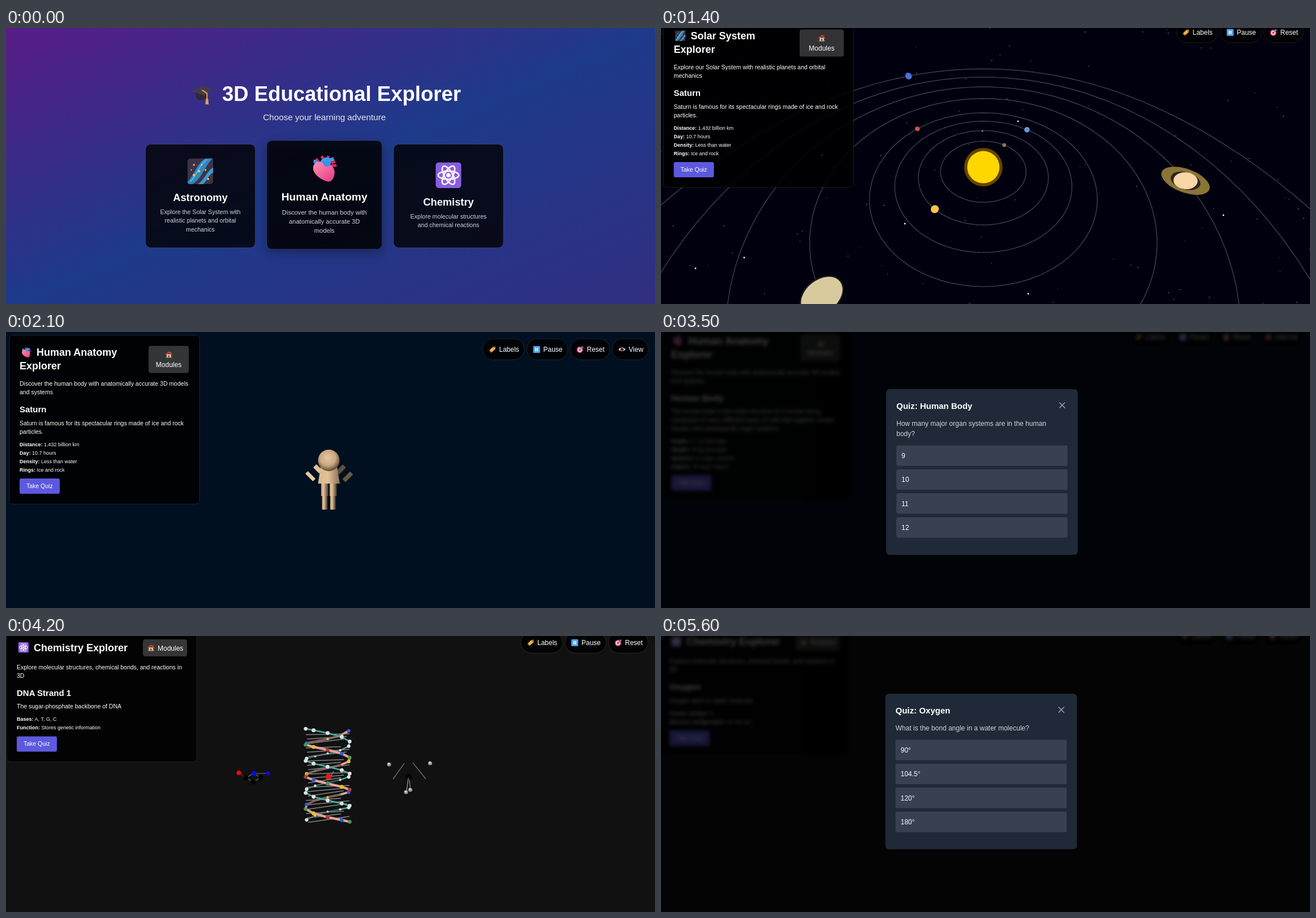
Recreate the animation shown at these times as an HTML page. Size 1147x488 px, loop 6.3 s.

```html
<!DOCTYPE html>
<html lang="en">
<head>
<meta charset="utf-8">
<title>3D Educational Explorer</title>
<style>
html, body { margin: 0; width: 100%; height: 100%; overflow: hidden; background: #000; }
svg { display: block; }
#stage { width: 100vw; height: 100vh; }
text { font-family: "Liberation Sans", Arial, sans-serif; white-space: pre; }
.scene { display: none; }
.raised { filter: drop-shadow(0 6px 9px rgba(0,0,0,.4)); }
.blurred { filter: blur(3px); }
</style>
</head>
<body>
<svg id="stage" viewBox="0 0 1147 488">
  <defs>
    <linearGradient id="sky" x2="1" y2="1">
      <stop stop-color="#581c87"/><stop offset=".5" stop-color="#1e3a8a"/><stop offset="1" stop-color="#312e81"/>
    </linearGradient>
    <linearGradient id="limb">
      <stop stop-color="#b8966c"/><stop offset=".3" stop-color="#e8c79c"/><stop offset="1" stop-color="#4b3b2d"/>
    </linearGradient>
    <linearGradient id="torso">
      <stop stop-color="#d9b88c"/><stop offset=".45" stop-color="#e3c198"/><stop offset="1" stop-color="#8b7056"/>
    </linearGradient>
    <radialGradient id="head" cx=".45" cy=".38" r=".62">
      <stop stop-color="#e8c8a0"/><stop offset=".6" stop-color="#c9a67e"/><stop offset="1" stop-color="#5b4734"/>
    </radialGradient>
    <linearGradient id="pink" x2="1" y2="1"><stop stop-color="#ff8fb5"/><stop offset="1" stop-color="#e63a80"/></linearGradient>

    <symbol id="galaxy" viewBox="0 0 20 20">
      <rect width="20" height="20" rx="2.5" fill="#3d3347"/>
      <path d="M0 18C5 14 7 4 14 0H20C14 4 12 15 4 20H2Q0 20 0 18Z" fill="#3187bd"/>
      <path d="M8 20C13 17 15 10 20 7V11C16 13 15 18 12 20Z" fill="#3b9bd2"/>
      <path d="M2 18C7 14 9 5 15 1" stroke="#55b4e2" fill="none"/>
      <g fill="#ffc83d"><circle cx="5" cy="5" r=".7"/><circle cx="11" cy="5" r=".6"/><circle cx="9" cy="10" r=".9"/>
      <circle cx="5" cy="13" r=".9"/><circle cx="14" cy="9" r=".7"/><circle cx="16" cy="16" r=".8"/><circle cx="3" cy="9" r=".5"/></g>
    </symbol>
    <symbol id="heart" viewBox="0 0 20 20">
      <path d="M6 6L4 3M10 5L8 1M12 5L13 1M15 6L18 5M15 8L19 8" stroke="#e0245e" stroke-width="2"/>
      <path d="M2 5Q5 5 5 9M8 6Q10 2 14 4L17 3" stroke="#3b9af0" stroke-width="2.6" fill="none"/>
      <path d="M2 8C4 4 8 5 10 7C14 6 18 9 17.500 14C17 18 15 20 13 20C8 19 0 14 2 8Z" fill="url(#pink)"/>
      <path d="M9 7Q11 3 15 5Q15 9 11 9Z" fill="#3d8fe8"/>
    </symbol>
    <symbol id="atom" viewBox="0 0 20 20">
      <rect width="20" height="20" rx="2.500" fill="#8a5de0"/>
      <g fill="none" stroke="#fff" stroke-width="1.100"><ellipse cx="10" cy="10" rx="8" ry="3.200"/>
      <ellipse cx="10" cy="10" rx="8" ry="3.200" transform="rotate(60 10 10)"/>
      <ellipse cx="10" cy="10" rx="8" ry="3.200" transform="rotate(120 10 10)"/></g>
      <circle cx="10" cy="10" r="1.700" fill="#fff"/>
    </symbol>
    <symbol id="cap" viewBox="0 0 20 20">
      <path d="M4 9L5 14Q10 17 15 12V8Z" fill="#2f2836"/>
      <path d="M0 7L10 2L20 5L12 11Z" fill="#443b4b"/>
      <path d="M10 6L14.500 9V15" stroke="#e59a45" stroke-width="1.100" fill="none"/>
      <path d="M13.500 14H15.500L16 19H13Z" fill="#f29a55"/>
    </symbol>
    <symbol id="house" viewBox="0 0 20 20">
      <path d="M4 9H16V19H4Z" fill="#e8c9a6"/><path d="M10 1L20 10L18 12L10 5L2 12L0 10Z" fill="#d0453f"/>
      <path d="M14 2H17V7L14 5Z" fill="#9b4b43"/><path d="M8 12H12V19H8Z" fill="#8a4f3b"/>
      <path d="M1 19Q1 14 5 15L6 19ZM14 19Q15 14 19 16V19Z" fill="#4f9c45"/>
    </symbol>
    <symbol id="tag" viewBox="0 0 20 20">
      <path d="M2 12L11 3L18 2L18 9L8 18Z" fill="#f7b13c"/><path d="M2 12L8 18L6 19L1 14Z" fill="#c97a2b"/>
      <circle cx="15" cy="5" r="1.500" fill="#6a4520"/>
    </symbol>
    <symbol id="pause" viewBox="0 0 20 20">
      <rect width="20" height="20" rx="3" fill="#4a9ff0"/><path d="M6 5H9V15H6ZM11 5H14V15H11Z" fill="#fff"/>
    </symbol>
    <symbol id="target" viewBox="0 0 20 20">
      <circle cx="9" cy="11" r="9" fill="#e0416a"/><circle cx="9" cy="11" r="6" fill="#f5e8ef"/><circle cx="9" cy="11" r="3.500" fill="#e0416a"/>
      <path d="M9 11L16 4" stroke="#3b79c8" stroke-width="1.800"/><path d="M14 5V2L17 0V3H20L18 6Z" fill="#4a9ff0"/>
    </symbol>
    <symbol id="eye" viewBox="0 0 20 20">
      <path d="M0 10Q10 -1 20 10Q10 21 0 10Z" fill="#f3e6ee"/><circle cx="10" cy="10" r="5" fill="#7d4533"/><circle cx="10" cy="10" r="2.500" fill="#1b1418"/>
    </symbol>
  </defs>
</svg>
<script>
const SCENE_MS = 700, W = 1147, H = 488, TAU = Math.PI * 2;

const rect = (x, y, w, h, r, fill, more = '') =>
  `<rect x="${x}" y="${y}" width="${w}" height="${h}" rx="${r}" fill="${fill}" ${more}/>`;
const circle = (x, y, r, fill) => `<circle cx="${x}" cy="${y}" r="${r}" fill="${fill}"/>`;
const line = (x1, y1, x2, y2, color, w) =>
  `<path d="M${x1} ${y1}L${x2} ${y2}" stroke="${color}" stroke-width="${w}"/>`;
const text = (x, y, size, str, more = '') => `<text x="${x}" y="${y}" font-size="${size}" fill="#fff" ${more}>${str}</text>`;
const icon = (name, x, y, size) => `<use href="#${name}" x="${x}" y="${y}" width="${size}" height="${size}"/>`;
const lines = (x, y, step, size, rows, more) => rows.map((s, i) => text(x, y + i * step, size, s, more)).join('');
const backdrop = color => rect(-30, -30, W + 60, H + 60, 0, color);
const BOLD = 'font-weight="700"', MID = 'text-anchor="middle"', EDGE = 'stroke="#fff" stroke-opacity=".1"';

/* ---- menu ---- */
function card(cx, iconName, iconY, titleY, title, rows, k = 1) {
  const w = 194 * k, h = 183 * k, size = 45.5 * k;
  return `<g ${k > 1 ? 'class="raised"' : ''}>` + rect(cx - w / 2, 297 - h / 2 - (k > 1 ? 2 : 0), w, h, 9, 'rgba(0,0,0,.8)', EDGE) + '</g>' +
    icon(iconName, cx - size / 2, iconY, size) +
    text(cx, titleY, 18.3 * k, title, BOLD + MID.padStart(MID.length + 1)) +
    lines(cx, titleY + (k > 1 ? 25 : 23), 15.3 * k, 10.65 * k, rows, MID + ' style="fill:#d1d5db"');
}
const menu = () => rect(0, 0, W, H, 0, 'url(#sky)') +
  icon('cap', 327, 98, 39) +
  text(382, 129, 36.5, '3D Educational Explorer', BOLD) +
  text(562.7, 163, 15.25, 'Choose your learning adventure', MID + ' style="fill:#e5e7eb"') +
  card(343.5, 'galaxy', 230.5, 306, 'Astronomy', ['Explore the Solar System with', 'realistic planets and orbital', 'mechanics']) +
  card(562.7, 'heart', 224, 304.5, 'Human Anatomy', ['Discover the human body with', 'anatomically accurate 3D', 'models'], 1.05) +
  card(782, 'atom', 237.5, 314, 'Chemistry', ['Explore molecular structures', 'and chemical reactions']);

/* ---- shared interface ---- */
const PILLS = {
  Labels: ['tag', 73.5], Pause: ['pause', 72.5], Reset: ['target', 69.5], View: ['eye', 64], Internal: ['heart', 79]
};
function toolbar(x, y, extra = []) {
  let out = '';
  for (const name of ['Labels', 'Pause', 'Reset', ...extra]) {
    const [symbol, w] = PILLS[name];
    out += rect(x, y, w, 37, 18.5, 'rgba(0,0,0,.8)', EDGE) + icon(symbol, x + 11, y + 12.5, 12.5) + text(x + 29, y + 23, 12, name);
    x += w + 4.5;
  }
  return out;
}

function panel(x, y, { symbol, title, button, intro, info }) {
  const left = x + 18, [bx, bw] = button, tall = title.length > 1, head = tall ? 48 : 30;
  const by = y + 18.5, titleY = y + (tall ? 36 : 39);
  let out = icon(symbol, left + 2.5, titleY - 15.5, 18.5) + text(left + 30, titleY, 18, title[0], BOLD);
  if (tall) out += text(left, titleY + 24, 18, title[1], BOLD);
  out += rect(x + bx, by, bw, head, 4, 'rgba(255,255,255,.2)') + (tall
    ? icon('house', x + bx + bw / 2 - 6, by + 9, 12.5) + text(x + bx + bw / 2, by + 37, 12, 'Modules', MID)
    : icon('house', x + bx + 8, by + 8.5, 12.5) + text(x + bx + 26, by + 19.5, 12, 'Modules'));
  let base = y + head + 41;
  out += lines(left, base, 15, 10.5, intro);
  base += (intro.length - 1) * 15;
  if (info) {
    out += text(left, base += 32, 15, info.name, BOLD);
    out += lines(left, base += 22.5, 15, 10.5, info.about);
    base += (info.about.length - 1) * 15 + 22;
    out += lines(left, base, 15, 9, info.facts.map(([k, v]) => `<tspan font-weight="700">${k}:</tspan> ${v}`));
    base += (info.facts.length - 1) * 15 + 12.5;
    out += rect(left, base, 71, 27, 3, '#5c59df') + text(left + 12, base + 16.5, 10.5, 'Take Quiz');
    base += 45;
  } else base += 34;
  return rect(x, y, 336, base - y, 7, 'rgba(0,0,0,.85)', EDGE) + out;
}

function quiz(x, y, name, question, answers) {
  let top = y + 65 + question.length * 18 - 1;
  const h = top - y + 193;
  return rect(x, y, 338.5, h, 6, '#1f2937') + text(x + 18, y + 34.5, 15, 'Quiz: ' + name, BOLD) +
    `<path d="M${x + 306} ${y + 23.5}l10 10m0-10l-10 10" stroke="#9ca3af" stroke-width="1.5"/>` +
    lines(x + 18, y + 65, 18, 12, question, 'style="fill:#d1d5db"') +
    answers.map((a, i) => rect(x + 18, top - 0.5 + i * 42.3, 302.5, 36.3, 3, '#374151') + text(x + 27, top + 22 + i * 42.3, 12, a)).join('');
}
const dimmed = (color, content, modal) => backdrop(color) + `<g class="blurred">${content}</g>` + backdrop('rgba(0,0,0,.75)') + modal;

/* ---- astronomy: circles on a plane seen from 45 degrees ---- */
const FOCAL = 352, TILT = Math.SQRT1_2, SUN = { x: 569.7, y: 246 };
function project(orbit, angle) {
  const q = orbit / 94.28, z = q * Math.sin(angle), depth = 1 - TILT * z;
  return { x: SUN.x + FOCAL * q * Math.cos(angle) / depth, y: SUN.y + FOCAL * TILT * z / depth, depth };
}
// orbit, angle in degrees, size, colour
const PLANETS = [
  [20, -31.2, 3.8, '#8c7853'], [30, 145.9, 5.7, '#ffc649'], [40, -38, 5.8, '#6b93d6'], [50, -130.6, 5, '#c8524f'],
  [70, 138.7, 17.3, '#d8ca9d'], [90, 11, 14, '#fad5a5'], [110, 62, 10, '#4fd0e7'], [130, -116.3, 10, '#4b70dd']
];
function planet([orbit, degrees, size, color], step) {
  const p = project(orbit, (degrees - step * 500 / orbit) * TAU / 360);
  const dx = p.x - SUN.x, dy = p.y - SUN.y, r = size / p.depth;
  const stretch = Math.hypot(1, Math.hypot(dx, dy) / FOCAL), turn = Math.atan2(dy, dx) * 360 / TAU;
  const oval = (rx, ry, extra, more) => `<ellipse rx="${rx}" ry="${ry}" transform="translate(${p.x} ${p.y}) rotate(${turn + extra})" ${more}/>`;
  const ring = orbit === 90
    ? oval(r * 3, r * 1.4, 16, 'fill="#8a7436"') + oval(r * 1.8, r * 1.02, 12, 'fill="#2b2620"') : '';
  const rim = orbit === 70 ? 'stroke="#1a191e" stroke-width="5" paint-order="stroke"' : '';
  return ring + oval(r * stretch, r, 0, `fill="${color}" ${rim}`);
}
function stars() {
  let seed = 11, out = '';
  const random = () => (seed = seed * 16807 % 2147483647) / 2147483647;
  for (let i = 0; i < 120; i++) out += circle(random() * W, random() * H, 0.8, `rgba(255,255,255,${0.2 + random() * 0.5})`);
  for (const [x, y] of [[568, 182], [631, 165], [285, 225], [147, 406], [431, 346], [649, 470], [994, 331], [61, 425]])
    out += circle(x, y, 1.4, '#fff');
  return out;
}
function solarSystem(step) {
  const orbits = PLANETS.map(([orbit]) => {
    const points = Array.from({ length: 96 }, (_, i) => project(orbit, i / 96 * TAU)).map(p => `${p.x},${p.y}`);
    return `<polygon points="${points.join(' ')}" fill="none" stroke="#3c3c48" stroke-width="1.5"/>`;
  });
  return backdrop('#00000f') + stars() + orbits.join('') + circle(SUN.x, SUN.y, 34, '#664400') + circle(SUN.x, SUN.y, 28.5, '#ffd700') +
    PLANETS.map(p => planet(p, step)).join('');
}

/* ---- anatomy ---- */
function mannequin(dy) {
  const arm = (x, y, len, w, turn, fill) => rect(-len / 2, -w / 2, len, w, 1, fill, `transform="translate(${x} ${y}) rotate(${turn})"`);
  return `<g transform="translate(0 ${dy})">` +
    arm(551, 242, 15, 8, 45, '#dfc297') + arm(538, 255, 19, 6.5, 45, '#e6cb9b') +
    arm(592, 243, 17, 8, -45, '#5f4d3c') + arm(604, 256, 19, 7.5, -45, '#6a5743') +
    rect(557, 267, 12.5, 23, 0, 'url(#limb)') + rect(572, 267, 12.5, 23, 0, 'url(#limb)') +
    rect(558.5, 290, 9.5, 24, 0, 'url(#limb)') + rect(573, 290, 9.5, 24, 0, 'url(#limb)') +
    '<path d="M556 238H585L590 268H551.500Z" fill="url(#torso)"/>' + circle(570.5, 227, 19, 'url(#head)') + '</g>';
}

/* ---- chemistry ---- */
function dna() {
  const node = (k, side) => {
    const a = k * TAU / 10, z = side * Math.cos(a), s = 1 + 0.073 * z;
    return { x: 568.5 + side * 40 * Math.sin(a) * s, y: 250 + (5.55 * k - 73.1) * s, z, s };
  };
  const parts = [];
  for (let i = 0; i < 21; i++) {
    const y = 176 + i * 7.6, lean = i % 3 * 3 + 3, cut = i % 4 * 5;
    parts.push([i % 2 ? 0.3 : -0.5, line(530 + (i % 3) * 2, y + (y - 250) * .02, 607 - cut, y - lean, '#858585', 1.5)]);
  }
  for (const side of [1, -1])
    for (let k = -2; k < 28; k++) {
      const a = node(k, side), b = node(k + 1, side), near = a.z > -0.35;
      const tube = side > 0 ? (near ? '#45aaa3' : '#2b716c') : (near ? '#e9a09b' : '#80605d');
      const bead = side > 0 ? '#dfe3e3' : ['#e3c81f', '#a83a38', '#2d5fd0', '#4a9a58'][(k + 4) % 4];
      if (k < 27) parts.push([(a.z + b.z) / 2, line(a.x, a.y, b.x, b.y, tube, (side > 0 ? 2.6 : 4) * a.s)]);
      parts.push([a.z + 0.4, circle(a.x, a.y, (near ? 3.2 : 2.3) * a.s, bead)]);
    }
  parts.push([0, circle(570, 249, 5.5, '#e01818') + line(574, 248, 579, 239, '#8a8a8a', 1.5)]);
  return parts.sort((a, b) => a[0] - b[0]).map(p => p[1]).join('');
}
const sideMolecules = () =>
  line(411, 242, 424, 251, '#8a2020', 1.5) + line(424, 251, 437, 243, '#555', 1.5) + line(424, 251, 437, 258, '#555', 1.5) +
  line(437, 258, 450, 250, '#555', 1.5) + line(450, 250, 438, 243, '#555', 1.5) + line(438, 243, 463, 243, '#4a4a90', 1.5) +
  circle(424, 251, 4.5, '#020202') + circle(437, 258, 4.5, '#020202') + circle(450, 250, 4.5, '#020202') +
  circle(411.5, 242, 4, '#f00808') + circle(438, 243, 4, '#0808f0') + circle(463, 243, 3.5, '#0808e8') +
  line(704, 225, 684, 253, '#666', 1.5) + line(719, 224, 742, 253, '#666', 1.5) + circle(711.5, 250, 6, '#020202') +
  line(711, 251, 708, 275, '#8a8a8a', 1.5) + line(713, 254, 714.5, 271, '#777', 1.5) +
  [[677, 227], [749.5, 225], [707, 276], [714.5, 272]].map(([x, y]) => circle(x, y, 3.6, '#8f9893') + circle(x - 0.5, y - 1, 1.8, '#d5dcd8')).join('');
const molecules = (zoom, spread) => `<g transform="translate(568.5 250) scale(${zoom}) translate(-568.5 -250)">` +
  `<g transform="translate(568.5 0) scale(${spread} 1) translate(-568.5 0)">${sideMolecules()}</g>${dna()}</g>`;

/* ---- content ---- */
const saturn = {
  name: 'Saturn', about: ['Saturn is famous for its spectacular rings made of ice and rock', 'particles.'],
  facts: [['Distance', '1.432 billion km'], ['Day', '10.7 hours'], ['Density', 'Less than water'], ['Rings', 'Ice and rock']]
};
const humanBody = {
  name: 'Human Body',
  about: ['The human body is the entire structure of a human being,', 'composed of many different types of cells that together create', 'tissues and subsequently organ systems'],
  facts: [['Height', '1.7 m (average)'], ['Weight', '70 kg (average)'], ['Systems', '11 major systems'], ['Organs', '78 major organs']]
};
const strand = {
  name: 'DNA Strand 1', about: ['The sugar-phosphate backbone of DNA'],
  facts: [['Bases', 'A, T, G, C'], ['Function', 'Stores genetic information']]
};
const oxygen = {
  name: 'Oxygen', about: ['Oxygen atom in water molecule'],
  facts: [['Atomic number', '8'], ['Electron configuration', '1s² 2s² 2p⁴']]
};
const astronomy = info => ({ symbol: 'galaxy', title: ['Solar System', 'Explorer'], button: [240.5, 78], info,
  intro: ['Explore our Solar System with realistic planets and orbital', 'mechanics'] });
const anatomy = info => ({ symbol: 'heart', title: ['Human Anatomy', 'Explorer'], button: [246, 71], info,
  intro: ['Discover the human body with anatomically accurate 3D models', 'and systems'] });
const chemistry = info => ({ symbol: 'atom', title: ['Chemistry Explorer'], button: [241, 78], info,
  intro: ['Explore molecular structures, chemical bonds, and reactions in', '3D'] });

const NIGHT = '#001020', LAB = '#111';
const bodyView = mannequin(-21) + panel(0, -14.5, anatomy(humanBody)) + toolbar(827, -10, ['Internal']);
const oxygenView = panel(-3, -23, chemistry(oxygen)) + toolbar(909, -19);

const scenes = [
  menu(),
  solarSystem(0) + panel(4.5, -16, astronomy()) + toolbar(910.5, -11),
  solarSystem(1) + panel(4.5, -16, astronomy(saturn)) + toolbar(910.5, -11),
  backdrop(NIGHT) + mannequin(0) + panel(6, 6, anatomy(saturn)) + toolbar(842.5, 12, ['View']),
  backdrop(NIGHT) + bodyView,
  dimmed(NIGHT, bodyView, quiz(398, 101, 'Human Body', ['How many major organ systems are in the human', 'body?'], ['9', '10', '11', '12'])),
  backdrop(LAB) + molecules(1, 1) + panel(1, -12.5, chemistry(strand)) + toolbar(910, -7),
  backdrop(LAB) + molecules(1.3, 0.7) + oxygenView,
  dimmed(LAB, oxygenView, quiz(396.5, 102, 'Oxygen', ['What is the bond angle in a water molecule?'], ['90°', '104.5°', '120°', '180°']))
];
const stage = document.getElementById('stage');
stage.insertAdjacentHTML('beforeend', scenes.map(s => `<g class="scene">${s}</g>`).join(''));
const groups = [...stage.querySelectorAll('.scene')];

const start = performance.now();
function draw() {
  const current = Math.floor((performance.now() - start) / SCENE_MS) % groups.length;
  groups.forEach((g, i) => { g.style.display = i === current ? 'inline' : 'none'; });
  requestAnimationFrame(draw);
}
draw();
</script>
</body>
</html>
```
